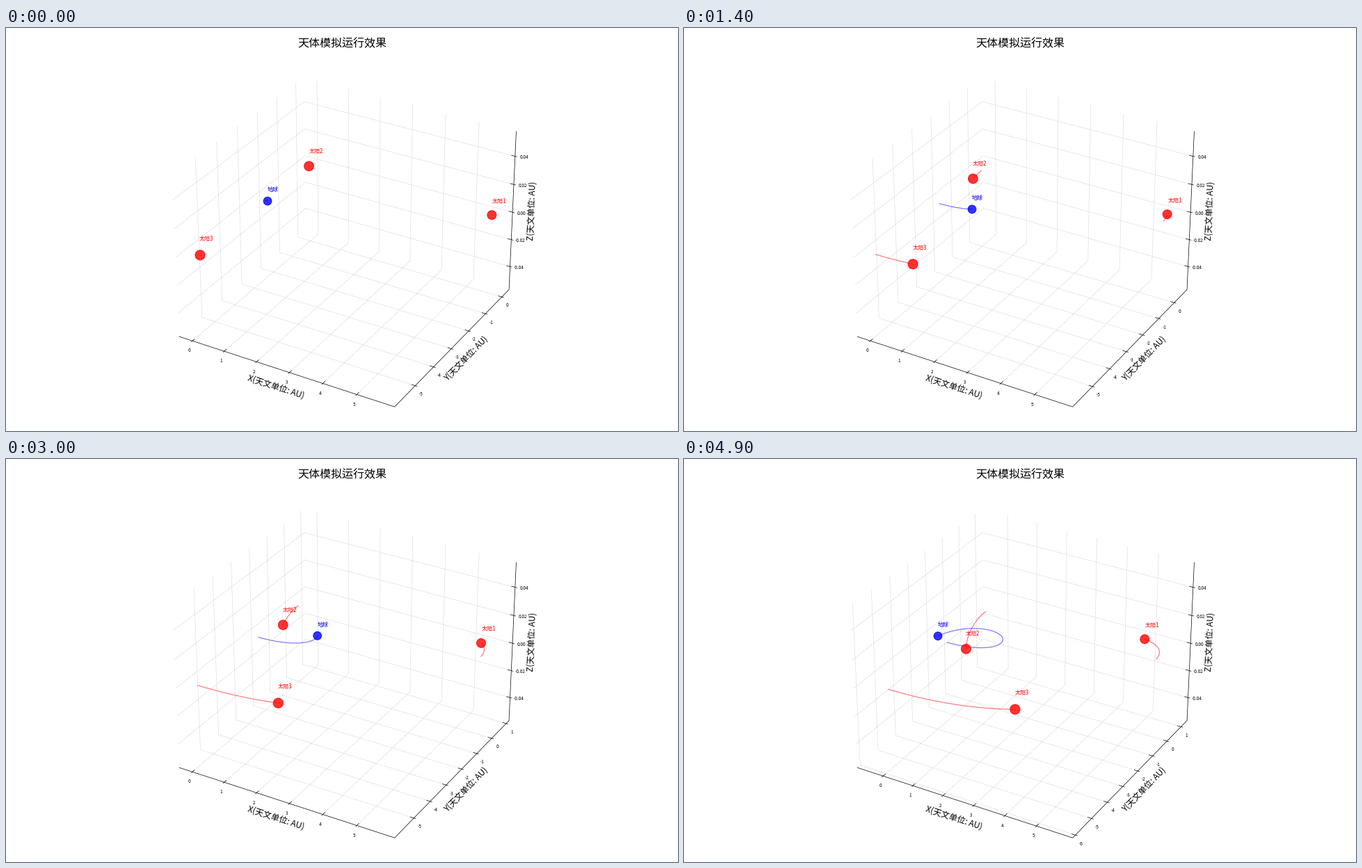
Write a matplotlib script that moves like this. It is 966 px wide and 580 px high and loops after 5 s.

```python
import math

import matplotlib.pyplot as plt
import numpy as np
from matplotlib.animation import FuncAnimation

WIDTH, HEIGHT, DPI = 966, 580, 100
FRAMES, INTERVAL = 50, 100
PT = 72 / DPI
plt.rcParams["font.family"] = ["Noto Sans CJK JP"]

# Units: km, s, kg; one frame is one week
AU = 149597870.7
WEEK = 7 * 24 * 3600
GRAVITY = 6.674e-20

# Perspective camera: elevation 30, azimuth -60, distance 10
COS30 = math.cos(math.pi / 6)
BOX = (25 / 21, 25 / 21, 25 / 28)
SIDE = 0.95 * HEIGHT
SCALE = SIDE / 0.185
CENTER_X = (WIDTH - SIDE) / 2 + 0.095 * SCALE
CENTER_Y = HEIGHT - 0.095 * SCALE
Z_HALF = 0.055 * 25 / 24

FAR, NEAR = AU + 7e8, AU + 2e8

# name, colour, radius, label lift, mass, position, velocity
BODIES = [
    ("太阳1", "red", 7.0, 0.090, 1.5e30, (FAR, 0), (0, 7)),
    ("太阳2", "red", 7.4, 0.097, 2.0e30, (0, 0), (0, -8)),
    ("太阳3", "red", 7.6, 0.102, 2.5e30, (0, -FAR), (18, 0)),
    ("地球", "blue", 6.4, 0.074, 6.0e24, (0, -NEAR), (15.5, 0)),
]


def simulate():
    """Positions in AU, indexed by step, body and axis."""
    mass = np.array([body[4] for body in BODIES])
    position = np.array([body[5] for body in BODIES], float)
    velocity = np.array([body[6] for body in BODIES], float)
    history = [position]
    for _ in range(FRAMES):
        gap = position[None, :] - position[:, None]
        distance = np.hypot(gap[..., 0], gap[..., 1])
        np.fill_diagonal(distance, np.inf)
        pull = GRAVITY * mass / distance ** 3
        velocity = velocity + (pull[..., None] * gap).sum(axis=1) * WEEK
        position = position + velocity * WEEK
        history.append(position)
    return np.array(history) / AU


HISTORY = simulate()


def project(x, y, z):
    """Map box fractions (0 to 1) to stage pixels."""
    x, y, z = ((np.asarray(c) - 0.5) * size for c, size in zip((x, y, z), BOX))
    across = COS30 * x + 0.5 * y
    away = -0.5 * x + COS30 * y
    up = 0.5 * away + COS30 * z
    factor = SCALE / (10 + COS30 * away - 0.5 * z)
    return CENTER_X + factor * across, CENTER_Y - factor * up


class Range:
    """Data range with the plot margins around it."""

    def __init__(self, values):
        self.low, self.high = values.min(), values.max()
        self.size = self.high - self.low

    def fraction(self, value):
        middle = (self.low + self.high) / 2
        return 0.5 + (value - middle) / (self.size * 1.1 * 25 / 24)

    def ticks(self):
        pad = 0.05 * self.size
        return range(math.ceil(self.low - pad), math.floor(self.high + pad) + 1)


fig = plt.figure(figsize=(WIDTH / DPI, HEIGHT / DPI), dpi=DPI, facecolor="white")
ax = fig.add_axes([0, 0, 1, 1])


def path(points, **style):
    ax.plot(*project(*zip(*points)), **style)


def grid(points):
    path(points, color="0.66", lw=0.64 * PT, ls=":", zorder=1)


def edge(*points):
    path(points, color="black", lw=0.7 * PT, zorder=2)


def text(x, y, content, size, ha="center", color="black"):
    ax.text(x, y + 0.37 * size, content, size=size * PT, ha=ha, va="baseline",
            color=color, zorder=6)


def tick_label(point, dx, dy, content):
    x, y = project(*point)
    text(x + dx, y + dy, content, 6.4)


def axis_label(x, y, letter, angle):
    ax.text(x, y, f"{letter}(天文单位: AU)", size=12 * PT, rotation=angle,
            rotation_mode="anchor", ha="center", va="center", zorder=6)


def draw_box(xs, ys):
    out, inside = -0.008, 0.016
    for value in xs.ticks():
        f = xs.fraction(value)
        grid([(f, 0, 0), (f, 1, 0), (f, 1, 1)])
        edge((f, out, 0), (f, inside, 0))
        tick_label((f, 0, 0), -4, 13.8, str(value))
    for value in ys.ticks():
        f = ys.fraction(value)
        grid([(1, f, 0), (0, f, 0), (0, f, 1)])
        edge((1 - out, f, 0), (1 - inside, f, 0))
        tick_label((1, f, 0), 8, 12, str(value))
    for step in range(-2, 3):
        value = 0.02 * step
        f = 0.5 + value / (2 * Z_HALF)
        grid([(1, 1, f), (0, 1, f), (0, 0, f)])
        edge((1 - out, 1, f), (1 - inside, 1, f))
        tick_label((1, 1, f), 12.7, 1, f"{value:.2f}")
    edge((0, 0, 0), (1, 0, 0), (1, 1, 0), (1, 1, 1))
    axis_label(388, 516.5, "X", -18.1)
    axis_label(661.5, 476, "Y", 45.7)
    axis_label(755.5, 263, "Z", 87.5)


def draw_body(body, fx, fy):
    name, color, radius, lift = body[:4]
    rim = 1.2
    ax.plot(*project(fx, fy, 0.5), color=color, lw=1.15 * PT, alpha=0.55, zorder=3)
    center = project(fx[-1], fy[-1], 0.5)
    ax.add_patch(plt.Circle(center, radius - rim / 2, color=color, alpha=0.8,
                            lw=rim * PT, zorder=4))
    x, y = project(fx[-1], fy[-1], 0.5 + lift)
    text(x, y, name, 8, ha="left", color=color)


def draw(frame):
    ax.clear()
    ax.set(xlim=(0, WIDTH), ylim=(HEIGHT, 0))
    ax.axis("off")
    text(483, 21.3, "天体模拟运行效果", 16)

    trails = HISTORY[:frame + 2]
    xs, ys = Range(trails[..., 0]), Range(trails[..., 1])
    draw_box(xs, ys)
    for i, body in enumerate(BODIES):
        draw_body(body, xs.fraction(trails[:, i, 0]), ys.fraction(trails[:, i, 1]))
    return []


anim = FuncAnimation(fig, draw, frames=FRAMES, interval=INTERVAL,
                     init_func=lambda: [], repeat=True, repeat_delay=0)
plt.show()
```
